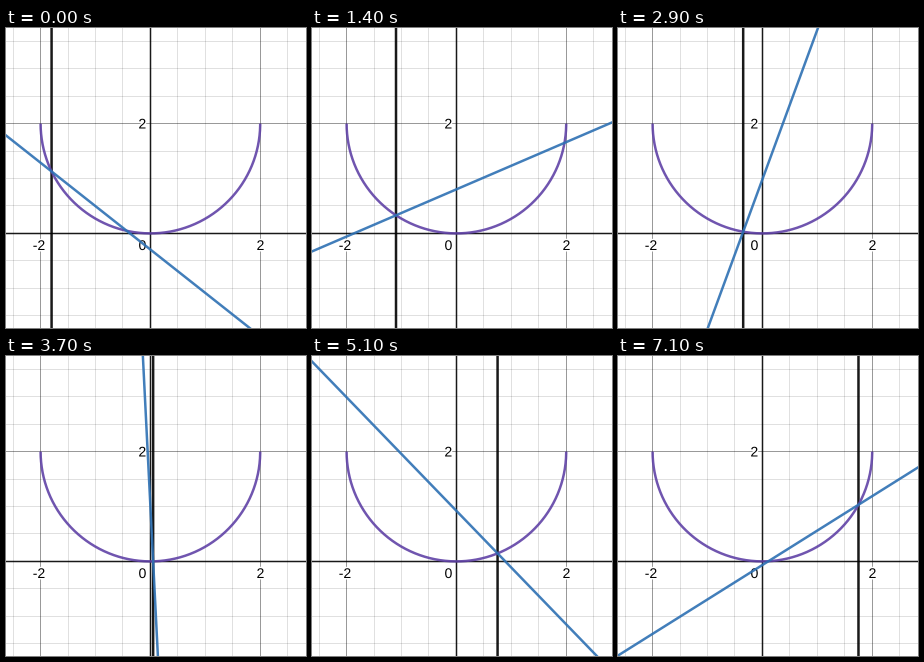
A matplotlib script for the animation above (7200 ms loop, 300 px wide and 300 px high).

```python
import math

import matplotlib.pyplot as plt
import numpy as np
from matplotlib.animation import FuncAnimation
from matplotlib.patheffects import withStroke

SIZE, DPI = 300, 100
PX = 72 / DPI            # one pixel in points
UNIT = 54.9              # pixels per graph unit
X0, Y0 = 144.4, 205.4    # origin in pixels
RADIUS = 2
FRAMES, INTERVAL = 72, 100
START, STEP = -1.8, 0.05
BLUE, PURPLE, BLACK = "#2d70b3", "#6042a6", "#000000"


def to_x(x):
    return X0 + UNIT * x


def to_y(y):
    return Y0 - UNIT * y


def crisp(v):
    return math.floor(v) + 0.5


fig = plt.figure(figsize=(SIZE / DPI, SIZE / DPI), dpi=DPI, facecolor="white")
ax = fig.add_axes([0, 0, 1, 1])
ax.set_xlim(0, SIZE)
ax.set_ylim(SIZE, 0)
ax.axis("off")


def stroke(xs, ys, color, width, alpha, z):
    line, = ax.plot(xs, ys, color=color, lw=width * PX, alpha=alpha, zorder=z,
                    solid_capstyle="butt", snap=False)
    return line


def grid_style(i):
    """Width, opacity and layer of the i-th half-unit grid line."""
    if i == 0:
        return 1.5, 0.9, 3
    if i % 4 == 0:
        return 1, 0.4, 2
    return 1, 0.12, 1


def label(x, y, text, align):
    ax.text(x, y, text, family="Liberation Sans", size=14 * PX, color="black",
            ha=align, va="baseline", zorder=4,
            path_effects=[withStroke(linewidth=3 * PX, foreground="white")])


for i in range(-8, 9):
    width, alpha, z = grid_style(i)
    gx, gy = crisp(to_x(i / 2)), crisp(to_y(i / 2))
    if 0 < gx < SIZE:
        stroke([gx, gx], [0, SIZE], BLACK, width, alpha, z)
    if 0 < gy < SIZE:
        stroke([0, SIZE], [gy, gy], BLACK, width, alpha, z)

label(33, 222, "-2", "center")
label(254.5, 222, "2", "center")
label(140.3, 222, "0", "right")
label(140.3, 100.5, "2", "right")

theta = np.linspace(-math.pi / 2, math.pi / 2, 200)
ray = stroke([], [], BLACK, 2.5, 0.9, 5)
stroke(to_x(RADIUS * np.sin(theta)), to_y(RADIUS - RADIUS * np.cos(theta)),
       PURPLE, 2.5, 0.9, 6)
bounce = stroke([], [], BLUE, 2.5, 0.9, 7)


def update(k):
    a = round(START + STEP * k, 4)
    x = to_x(a)
    ray.set_data([x, x], [-5, SIZE + 5])

    # The reflected slope is undefined at the centre, so no line is drawn there.
    if a == 0:
        bounce.set_data([], [])
        return ray, bounce
    tilt = math.asin(a / RADIUS)
    y = to_y(RADIUS - RADIUS * math.cos(tilt))
    dx, dy = math.sin(2 * tilt), math.cos(2 * tilt)
    reach = 2 * SIZE
    bounce.set_data([x - reach * dx, x + reach * dx],
                    [y - reach * dy, y + reach * dy])
    return ray, bounce


anim = FuncAnimation(fig, update, frames=FRAMES, interval=INTERVAL,
                     repeat=True, repeat_delay=0, blit=False)
plt.show()
```
